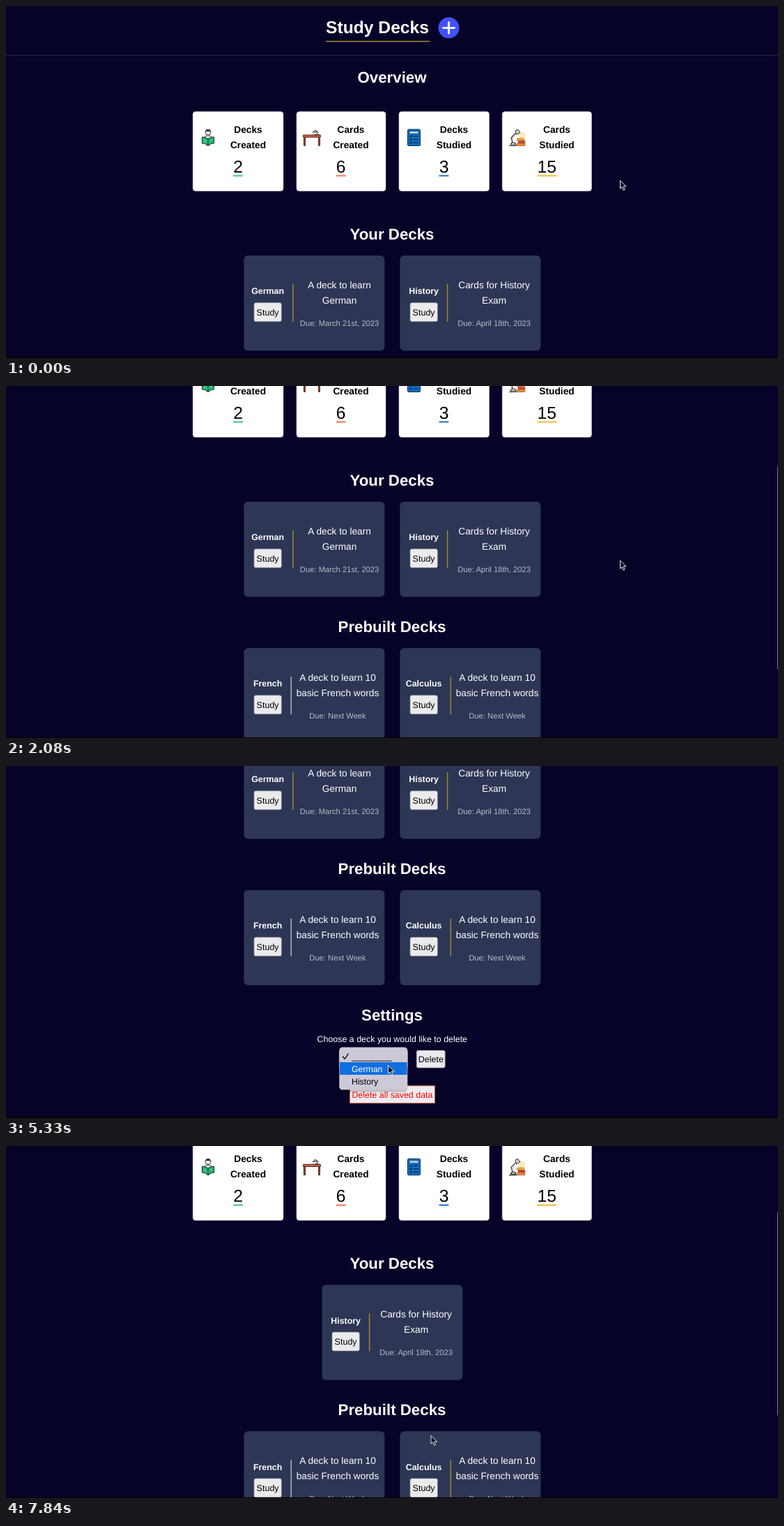
Write an HTML page that moves like this. It is 1108x505 px and loops after 7990 ms.

```html
<!DOCTYPE html>
<html lang="en">
<head>
<meta charset="utf-8">
<title>Study Decks</title>
<style>
  html, body { margin: 0; width: 100%; height: 100%; overflow: hidden; background: #060328; }
  svg { display: block; width: 1108px; height: 505px; }
  text { font-family: "Liberation Sans", Arial, sans-serif; text-rendering: geometricPrecision; white-space: pre; }
</style>
</head>
<body>
<svg id="stage" viewBox="0 0 1108 505"></svg>
<script>
const LOOP = 7990, STEPS = 54;

const text = (x, y, size, str, { fill = '#fff', bold = false, anchor = 'middle' } = {}) =>
  `<text x="${x}" y="${y}" font-size="${size}" fill="${fill}" text-anchor="${anchor}"${bold ? ' font-weight="700"' : ''}>${str}</text>`;
const rect = (x, y, w, h, fill, r = 0, extra = '') =>
  `<rect x="${x}" y="${y}" width="${w}" height="${h}" rx="${r}" fill="${fill}" ${extra}/>`;
const path = (d, fill = 'none', stroke = 'none', width = 1) =>
  `<path d="${d}" fill="${fill}" stroke="${stroke}" stroke-width="${width}" stroke-linejoin="round" stroke-linecap="round"/>`;
const circle = (x, y, r, fill, stroke = 'none') =>
  `<circle cx="${x}" cy="${y}" r="${r}" fill="${fill}" stroke="${stroke}"/>`;
const heading = (y, str) => text(554, y, 22.3, str, { bold: true });
const button = (x, y, w, h, id = '') =>
  rect(x, y, w, h, '#ebebee', 2.5, `stroke="#85858d" stroke-width=".7" ${id && `id="${id}"`}`);

const readerIcon =
  circle(290, 181, 4, '#fff', '#333') + path('M286 180q4-5 8 0', '#333', '#333', .6) +
  path('M283 190q2-4 7-4t7 4', '#eee', '#333') +
  path('M281.5 188q5 0 8.5 3q3.500-3 8.500-3v9q-5 0-8.500 3.500q-3.500-3.500-8.500-3.500z', '#22b573', '#173e34', 1.1) +
  path('M290 191v9', 'none', '#173e34', 1) + path('M284 192l3 1M284 194.500l3 1M293 193l3-1', 'none', '#9be0bd', .7);

const deskIcon =
  path('M428.500 188v11.500M449.500 188v11.500', 'none', '#33211e', 3) +
  path('M428.500 188v11M449.500 188v11', 'none', '#bd4d35', 1.4) +
  rect(426.500, 185, 25, 3.200, '#d95a3e', .5, 'stroke="#33211e" stroke-width=".9"') +
  path('M443 184.500h6M446 184.500l2-3.500l-4-2.500M440.500 181l3.500-3l2 2.500z', '#ddd', '#333', 1);

const listIcon =
  rect(576.500, 177, 18, 23.500, '#0e6cc4', 1.5, 'stroke="#10304f" stroke-width="1"') +
  rect(579, 179.500, 13, 4, '#a8d4f5', .5, 'stroke="#10304f" stroke-width=".7"') +
  [187, 191.500, 196].map(y =>
    path(`M579.500 ${y}l1 1.200l2-2.200M585 ${y}h6.500`, 'none', '#10263d', 1.2)).join('');

const lampIcon =
  path('M734 181l11 1v8h-8z', '#ffe9b5') +
  path('M724 199l2-3h4l2 3zM727 196l-2-7l8-8', '#ddd', '#333', 1.2) +
  path('M731 180q0-3 4-2.500l3 4l-5 3z', '#ccc', '#333', 1) +
  rect(733.500, 190, 10, 3.200, '#f2b52b', 1, 'stroke="#7c3d22" stroke-width=".6"') +
  rect(735, 193.400, 10, 3.300, '#df4034', 1, 'stroke="#7c3d22" stroke-width=".6"') +
  rect(733, 197, 12, 3.500, '#f08b2e', 1, 'stroke="#7c3d22" stroke-width=".6"') +
  path('M722.500 200.500h10', 'none', '#333', 1.2);

function statCard(x, w, labelX, labels, numX, value, color, icon) {
  const barW = 13.8 * value.length;
  return rect(x, 151.5, w, 114, '#fff', 4, 'stroke="#c9c9d2" stroke-width=".5"') + icon +
    labels.map((s, i) => text(labelX, 182 + 22 * i, 13.75, s, { fill: '#000', bold: true })).join('') +
    text(numX, 239, 24.7, value, { fill: '#000' }) +
    rect(numX - barW / 2, 242.5, barW, 2, color);
}

function deck(x, y, title, lines, due, bodyX, ruleX, ruleColor = '#a58d2d') {
  const titleX = x + 34.2;
  return rect(x, y, 202, 136.5, '#2d3654', 6) +
    text(titleX, y + 55.3, 12.4, title, { bold: true }) +
    button(titleX - 19.6, y + 67.7, 39.4, 27) +
    text(titleX, y + 85.5, 12.55, 'Study', { fill: '#000' }) +
    rect(ruleX - .7, y + 41, 1.4, 54, ruleColor) +
    lines.map((s, i) => text(bodyX, y + 47.2 + 22 * i, 13.7, s)).join('') +
    text(bodyX, y + 100.8, 11.22, due, { fill: '#b7bac5' });
}

const page =
  text(533, 39, 24.65, 'Study Decks', { bold: true }) +
  rect(459, 50, 149, 1.5, '#a88c22') +
  circle(635.5, 31.3, 15, '#4152fb') +
  path('M627.500 31.300h16M635.500 23.300v16', 'none', '#fff', 2.8) +
  rect(0, 70, 1108, 1, '#2b2b3c') +
  heading(109.6, 'Overview') +
  statCard(268.2, 129.8, 347.5, ['Decks', 'Created'], 333, '2', '#3fbf95', readerIcon) +
  statCard(417, 128, 495, ['Cards', 'Created'], 480.7, '6', '#ee7558', deskIcon) +
  statCard(564, 129.5, 643, ['Decks', 'Studied'], 628.5, '3', '#1b72c4', listIcon) +
  statCard(712.2, 128.3, 790.5, ['Cards', 'Studied'], 776.3, '15', '#f4bb35', lampIcon) +
  heading(335, 'Your Decks') +
  `<g id="german">${deck(341.4, 358, 'German', ['A deck to learn', 'German'], 'Due: March 21st, 2023', 478.6, 412)}</g>` +
  `<g id="history">${deck(565.4, 358, 'History', ['Cards for History', 'Exam'], 'Due: April 18th, 2023', 700.6, 633.6)}</g>` +
  heading(545, 'Prebuilt Decks') +
  deck(341.4, 568, 'French', ['A deck to learn 10', 'basic French words'], 'Due: Next Week', 476, 409.3, '#b9bbc4') +
  deck(565.4, 568, 'Calculus', ['A deck to learn 10', 'basic French words'], 'Due: Next Week', 705, 638.3) +
  heading(755, 'Settings') +
  text(554.3, 785.5, 12.43, 'Choose a deck you would like to delete') +
  button(478.4, 798, 98, 25) +
  text(483.5, 814.5, 12.43, '', { fill: '#000', anchor: 'start' }).replace('<text', '<text id="choice"') +
  path('M566.800 809.300l2.300 2.300l2.300-2.300', 'none', '#222', 1.2) +
  button(589.2, 798, 41, 25, 'delete') +
  text(609.8, 814.8, 12.5, 'Delete', { fill: '#000' }) +
  rect(493.4, 848.8, 122, 25, '#ececf0', 0, 'stroke="#e0502f" stroke-width=".8"') +
  text(554.4, 865.5, 12.43, 'Delete all saved data', { fill: '#f00' });

const menu =
  rect(479, 406, 97, 62, '#000', 5, 'opacity=".18"') +
  rect(478.3, 403.5, 98, 61, '#cdc9d6', 4.5) +
  rect(479, 425, 96.6, 18, '#1070e0', 0, 'id="highlight"') +
  path('M483.500 417l2.700 3.300l5-7.300', 'none', '#111', 1.4) +
  text(496, 420.5, 13, '________', { fill: '#000', anchor: 'start' }) +
  text(496, 438.8, 12.3, 'German', { anchor: 'start' }).replace('<text', '<text id="option"') +
  text(496, 456.6, 12.3, 'History', { fill: '#000', anchor: 'start' });

document.getElementById('stage').innerHTML =
  rect(0, 0, 1108, 505, '#060328') +
  `<g id="page">${page}</g>` +
  rect(0, 504, 1108, 1, '#000') +
  rect(1107, 0, 1, 291, '#77778a', 0, 'id="thumb"') +
  `<g id="menu">${menu}</g>` +
  `<g id="cursor">${path('M0 0v11.300l2.600-2.400l2 4.700l2-.9l-2-4.500h3.600z', '#0b0a1c', '#fff', .9)}</g>`;

const el = id => document.getElementById(id);
const [pageEl, german, history, choice, del, thumb, menuEl, highlight, option, cursor] =
  ['page', 'german', 'history', 'choice', 'delete', 'thumb', 'menu', 'highlight', 'option', 'cursor'].map(el);

// Tracks hold [step, value...] points; the picture advances in equal steps.
const scrollTrack = [[0, 0], [1, 5], [3, 38], [5, 74], [7, 98.7], [9, 126], [11, 150], [13, 150],
  [14, 192], [15, 245], [17, 335], [19, 386], [20, 392], [21, 392], [22, 391], [23, 390],
  [47, 390], [48, 364], [49, 318], [50, 271], [52, 190], [53, 158.7]];
const cursorTrack = [[0, 881.5, 250.7], [22, 881.5, 250.7], [24, 810, 290], [27, 600, 398],
  [29, 548.5, 418], [33, 548.5, 418], [36, 548.5, 430], [38, 548.5, 430], [41, 610, 416]];

function sample(track, step) {
  const i = track.findIndex(point => point[0] > step);
  if (i < 0) return track[track.length - 1].slice(1);
  const [a, b] = [track[i - 1], track[i]];
  const k = (step - a[0]) / (b[0] - a[0]);
  return a.slice(1).map((v, j) => v + (b[j + 1] - v) * k);
}
const show = (node, visible) => node.setAttribute('visibility', visible ? 'visible' : 'hidden');

function draw(ms) {
  const step = Math.min(STEPS - 1, Math.floor((ms % LOOP + 8) * STEPS / LOOP));
  const [scroll] = sample(scrollTrack, step);
  const [x, y] = sample(cursorTrack, step);
  const deleted = step >= 44;
  const onGerman = y >= 425;

  pageEl.setAttribute('transform', `translate(0 ${-scroll})`);
  cursor.setAttribute('transform', `translate(${x} ${y})`);
  show(german, !deleted);
  history.setAttribute('transform', `translate(${deleted ? -112 : 0} 0)`);
  choice.textContent = step >= 39 && !deleted ? 'German' : '___________';
  del.setAttribute('fill', step < 41 ? '#ebebee' : step === 43 ? '#f4f4f6' : '#d0cdd5');

  show(menuEl, step >= 33 && step < 39);
  highlight.setAttribute('y', onGerman ? 425 : 407);
  option.setAttribute('fill', onGerman ? '#fff' : '#000');

  thumb.setAttribute('y', scroll * .6);
  thumb.setAttribute('opacity', step < 1 || (step > 27 && step < 48) ? 0 : step > 25 && step < 28 ? .5 : 1);
}

const start = performance.now();
function frame() {
  draw(performance.now() - start);
  requestAnimationFrame(frame);
}
frame();
</script>
</body>
</html>
```
